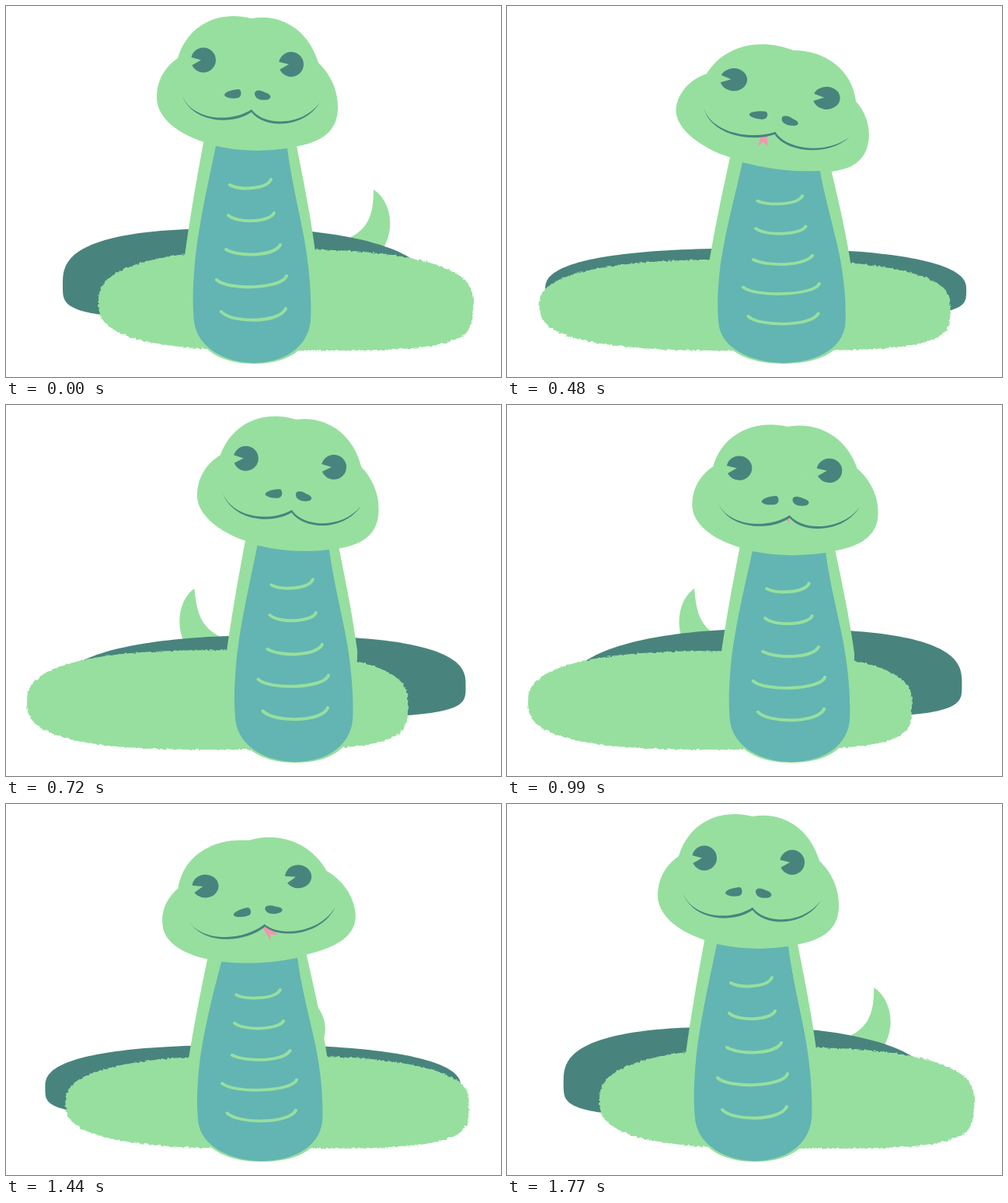
An HTML page for the animation above (1800 ms loop, 637 px wide and 477 px high).

```html
<!DOCTYPE html>
<html lang="en">
<head>
<meta charset="utf-8">
<title>Swaying snake</title>
<style>
  html, body { margin: 0; width: 100%; height: 100%; overflow: hidden; background: #fff; }
  svg { display: block; width: 100%; height: 100%; }
  .green { fill: #97df9f; }
  .teal { fill: #62b5b2; }
  .dark { fill: #48847d; }
  .pink { fill: #f297ae; }
  .lines { fill: none; stroke: #97df9f; stroke-width: 4; stroke-linecap: round; }
</style>
</head>
<body>
<svg viewBox="0 0 637 477">
  <filter id="rough" x="-5%" y="-5%" width="110%" height="110%" color-interpolation-filters="sRGB">
    <feTurbulence type="fractalNoise" baseFrequency=".25" numOctaves="2" seed="4"/>
    <feDisplacementMap in="SourceGraphic" scale="4" xChannelSelector="R" yChannelSelector="G"/>
  </filter>
  <path id="tail" class="green"/>
  <path id="back" class="dark"/>
  <path id="front" class="green" filter="url(#rough)"/>
  <g id="body">
    <path class="green" d="M256 165C244 230 237 270 230 321L240 400C244 448 285 460 318 460C355 460 392 448 396 400L398 316C392 270 383 225 372 170Z"/>
    <g id="head">
      <path class="green" d="M316 16C355 9 390 32 402 73C418 88 428 110 427 133C426 165 400 176 372 181Q316 190 255 175C215 162 194 140 194 118C194 95 205 78 221 67C234 24 274 5 316 16Z"/>
      <path id="tongue" class="pink" d="M-4.5 -45H4.5L4 -10L7 1L0 -5L-5 3L-4 -10Z"/>
      <path class="green" d="M226 114C240 149 290 153 316 135C330 156 380 158 403 124L380 85H250Z"/>
      <g class="dark">
        <path d="M226 114C239 147 288 151 316 133C331 154 380 156 404 124C382 159.5 331 157 316 136.500C289 154.500 239 150 226 114Z"/>
        <path d="M281 114C283 109 295 107 300 107C304 110 303 117 299 118C293 120 281 118 281 114Z"/>
        <path d="M320 112C321 107 328 108 333 111C340 113 343 117 338 120C331 122 320 121 320 112Z"/>
        <circle cx="254" cy="69.5" r="16"/>
        <circle cx="367" cy="75" r="16"/>
      </g>
      <path class="green" d="M235 65L251 69.5L236 78ZM348 71L364 75L349 83.5Z"/>
    </g>
    <path id="belly" class="teal"/>
    <path class="lines" d="M288 230C300 237 335 236 341 223M286 269C298 280 340 278 345 266M283 313C300 323 345 322 353 307M271 352C285 366 355 364 361 347M277 393C290 408 352 408 360 389"/>
  </g>
</svg>
<script>
const LOOP = 1800, STEP = 30, FLOOR = 459, MID = 316.5;
const set = (id, name, value) => document.getElementById(id).setAttribute(name, value);

const part = (t, a, b) => Math.min(1, Math.max(0, (t - a) / (b - a)));
const ease = p => (1 - Math.cos(Math.PI * p)) / 2;
const bump = p => Math.sin(Math.PI * p) ** 2;
// Sway out during a..b and home during c..d, sinking in the middle of each move
const sway = (t, a, b, c, d) => ease(part(t, a, b)) - ease(part(t, c, d));
const dip = (t, a, b, c, d) => bump(part(t, a, b)) + bump(part(t, c, d));

// Superellipse whose roundness differs in each quarter
function blob(cx, cy, w, up, down, roundness) {
  const points = [];
  for (let i = 0; i < 180; i++) {
    const a = i * Math.PI / 90, c = Math.cos(a), s = Math.sin(a);
    const e = 2 / roundness(c > 0, s < 0);
    const x = cx + Math.sign(c) * w * Math.abs(c) ** e;
    const y = cy + Math.sign(s) * (s < 0 ? up : down) * Math.abs(s) ** e;
    points.push(x.toFixed(1) + ' ' + y.toFixed(1));
  }
  return 'M' + points.join('L') + 'Z';
}

function drawBack(t) {
  const times = [128, 885, 915, 1800];
  const k = sway(t, ...times), s = dip(t, ...times);
  const lean = .35 * (1 - 2 * k);
  set('back', 'd', blob(309 + 25 * k, 358 + 6 * s, (236 + 14 * k) * (1 + .12 * s),
    72 - 20 * s, 44 - 6 * s,
    (right, top) => top ? 2.45 + (right ? -lean : lean) : 4));
}

function drawFront(t) {
  const times = [50, 825, 840, 1750];
  const k = sway(t, ...times), s = dip(t, ...times);
  set('front', 'd', blob(360 - 92 * k, 380 + 4 * s, 241 * (1 + .1 * s),
    67 - 9 * s, 63 - 4 * s,
    (right, top) => top ? 2.5 : right ? 4.2 : 2.8));
}

function drawTail(t) {
  const k = sway(t, 30, 800, 915, 1800);
  const side = k < .5 ? 1 : -1;
  const X = x => 470 - 228 * k + side * x;
  const bend = -100 * k * (1 - k), tip = X(3) + bend;
  set('tail', 'd', `M${tip} 236C${X(22) + bend / 2} 248 ${X(32)} 280 ${X(17)} 309` +
    `L${X(-30)} 311L${X(-26)} 297C${X(-2)} 285 ${X(3)} 264 ${tip} 236Z`);
}

function drawBody(t) {
  const x = MID + 54.5 * sway(t, 0, 780, 760, 1710);
  const s = dip(t, 0, 780, 845, 1695);
  set('body', 'transform',
    `translate(${x} ${FLOOR}) scale(${1 + .098 * s} ${1 - .103 * s}) translate(${-MID} ${-FLOOR})`);

  const tilt = 10.8 * bump(part(t, 0, 870)) - 11 * bump(part(t, 900, 1770));
  set('head', 'transform', `rotate(${tilt} 316 95)`);

  // The chin line on the belly follows about half of the tilt
  const d = .44 * tilt;
  set('belly', 'd', `M270 ${180 - d}C262 220 250 270 244 320C240 360 240 385 242 405` +
    `C246 441 285 459 318 459C355 459 388 441 392 405C394 365 388 320 382 290` +
    `C374 250 366 215 362 ${183 + d}Q316 190 270 ${180 - d}Z`);
}

function drawTongue(t) {
  const out = 36 * bump(part(t, 60, 630)) + 42 * bump(part(t, 910, 1600));
  const slide = part(t, 240, 480);
  const [x, turn] = t < 800 ? [-12 * slide, 19 - 20 * slide] : [0, -21];
  set('tongue', 'transform', `translate(${316 + x} 135) rotate(${turn}) translate(0 ${out})`);
  set('tongue', 'visibility', out > 4 ? 'visible' : 'hidden');
}

const start = performance.now();
function tick() {
  const t = Math.floor((performance.now() - start) / STEP) * STEP % LOOP;
  for (const draw of [drawTail, drawBack, drawFront, drawBody, drawTongue]) draw(t);
  requestAnimationFrame(tick);
}
tick();
</script>
</body>
</html>
```
